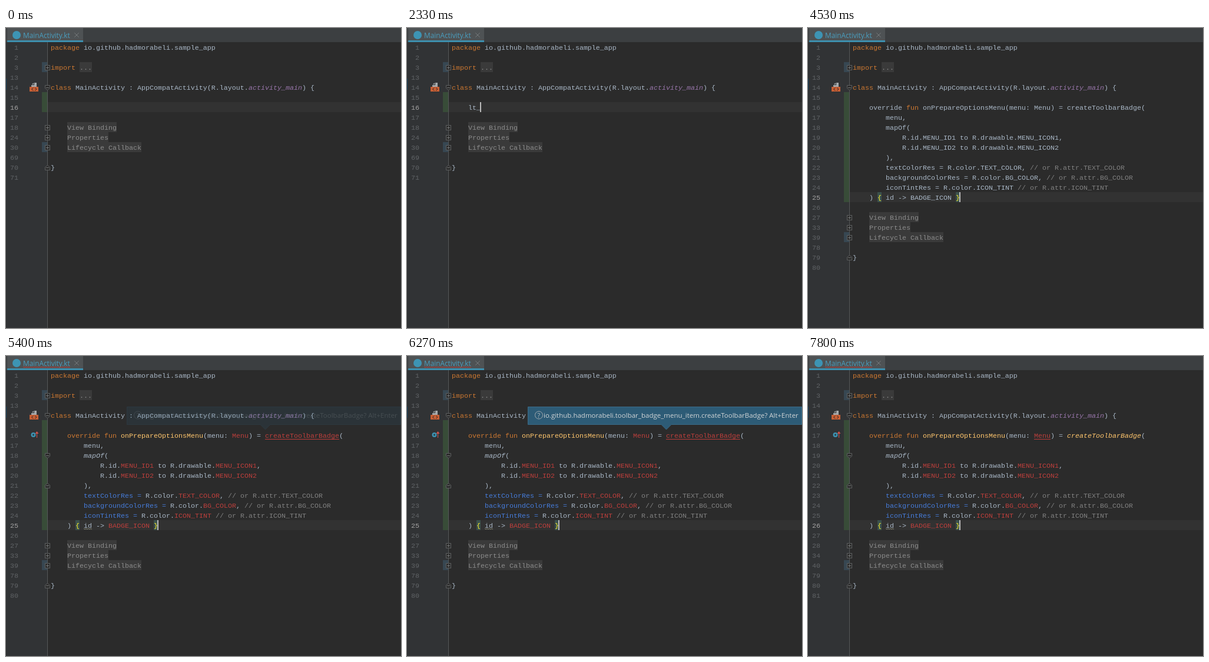
An HTML page with a canvas that plays this animation: 671 by 510 pixels, repeating every 8 s.

```html
<!DOCTYPE html>
<html>
<head>
<meta charset="utf-8">
<style>
  html, body { margin: 0; width: 100%; height: 100%; overflow: hidden; background: #2b2b2b; }
  canvas { display: block; }
</style>
</head>
<body>
<canvas id="stage" width="671" height="510"></canvas>
<script>
const ctx = document.getElementById('stage').getContext('2d');
const LOOP = 8000, ROW = 17, TOP = 24, LEFT = 76, CHAR = 7;
const MONO = '11.667px "Liberation Mono", monospace';
const UI = '"Open Sans", sans-serif';
const PLAIN = '#a9b7c6', RED = '#bc3f3c', YELLOW = '#ffc66d', ORANGE = '#cc7832';
const FOLD_EDGE = '#5c5e5f', FOLD_SIGN = '#717374';

const EXPAND = 4400, BRACES = 4530, KEYWORDS = 4800, ANALYSED = 5200, HINT = 5400,
      IMPORTED = 6800, RESOLVED = 7530, STYLED = 7670, MENU_MARKED = 7800;

// "~x" switches to style x until the next switch
const HEADER = [
  '~kpackage ~dio.github.hadmorabeli.sample_app',
  '',
  '~kimport ~f...',
  '',
  '~kclass ~dMainActivity : AppCompatActivity(R.layout.~pactivity_main~d) {',
  ''
];
const TEMPLATE = [
  '    ~ooverride ~kfun ~yonPrepareOptionsMenu~d(menu: ~uMenu~d) = ~ccreateToolbarBadge~d(',
  '        menu,',
  '        ~mmapOf~d(',
  '            R.id.~eMENU_ID1~d to R.drawable.~eMENU_ICON1~d,',
  '            R.id.~eMENU_ID2~d to R.drawable.~eMENU_ICON2',
  '        ),',
  '        ~ntextColorRes =~d R.color.~eTEXT_COLOR~d, ~g// or R.attr.TEXT_COLOR',
  '        ~nbackgroundColorRes =~d R.color.~eBG_COLOR~d, ~g// or R.attr.BG_COLOR',
  '        ~niconTintRes =~d R.color.~eICON_TINT~d ~g// or R.attr.ICON_TINT',
  '    ) ~b{~d ~wid~d -> ~eBADGE_ICON~d ~b}'
];
const FOOTER = ['', '    ~fView Binding', '    ~fProperties', '    ~fLifecycle Callback', '', '}', ''];

const TYPED = 'lt_toolbar';
const KEY_TIMES = [1930, 2070, 2270, 2530, 2730, 2870, 3000, 3200, 3270, 3400];
const POINTER = [[200, 14, 233], [270, 85, 160], [330, 160, 92], [470, 60, 60],
                 [530, 6, 30], [600, 160, 100], [730, 152, 135]];

const rowTop = i => TOP + ROW * i;

function box(x, y, w, h, color) {
  ctx.fillStyle = color;
  ctx.fillRect(x, y, w, h);
}

function text(str, x, y, color, font = MONO) {
  ctx.font = font;
  ctx.fillStyle = color;
  ctx.fillText(str, x, y);
}

function path(points, stroke, fill, close = true) {
  ctx.beginPath();
  points.forEach(([x, y]) => ctx.lineTo(x, y));
  if (close) ctx.closePath();
  if (fill) { ctx.fillStyle = fill; ctx.fill(); }
  if (stroke) { ctx.strokeStyle = stroke; ctx.lineWidth = 1; ctx.stroke(); }
}

function disc(x, y, r, color) {
  ctx.beginPath();
  ctx.arc(x, y, r, 0, 7);
  ctx.fillStyle = color;
  ctx.fill();
}

function wave(x1, x2, y, color) {
  const points = [];
  for (let x = x1; x <= x2; x += 2) points.push([x, y + (x - x1) % 4 / 2]);
  path(points, color, null, false);
}

function styleAt(code, t) {
  const analysed = t >= ANALYSED;
  switch (code) {
    case 'k': return { color: ORANGE };
    case 'o': return { color: t >= KEYWORDS ? ORANGE : PLAIN };
    case 'y': return { color: analysed ? YELLOW : PLAIN };
    case 'e': return { color: analysed ? RED : PLAIN };
    case 'u': return { color: analysed ? RED : PLAIN, underline: t >= MENU_MARKED };
    case 'n': return { color: analysed ? '#467cda' : PLAIN };
    case 'm': return { color: PLAIN, italic: analysed };
    case 'w': return { color: PLAIN, wavy: analysed };
    case 'p': return { color: '#9876aa', italic: true };
    case 'g': return { color: '#808080' };
    case 'f': return { color: '#8c8c8c', back: '#3a3a3a' };
    case 'b': return t >= BRACES ? { color: '#ffef28', back: '#3b514d' } : { color: PLAIN };
    case 'c':
      if (t >= STYLED) return { color: YELLOW, italic: true };
      return { color: analysed && t < RESOLVED ? RED : PLAIN, underline: t >= HINT && t < IMPORTED };
  }
  return { color: PLAIN };
}

function codeLine(source, row, t) {
  let x = LEFT;
  const y = rowTop(row);
  ('~d' + source).split('~').slice(1).forEach(part => {
    const style = styleAt(part[0], t), word = part.slice(1), width = word.length * CHAR;
    if (style.back) box(x, y, width, ROW, style.back);
    text(word, x, y + 13, style.color, (style.italic ? 'italic ' : '') + MONO);
    if (style.underline) box(x, y + 15, width, 1, RED);
    if (style.wavy) wave(x, x + width, y + 14.5, '#8a8a78');
    x += width;
  });
}

function foldBox(row) {
  const y = rowTop(row) + 5;
  box(66, y, 9, 9, FOLD_EDGE);
  box(67, y + 1, 7, 7, '#2b2b2b');
  box(68, y + 4, 5, 1, FOLD_SIGN);
  box(70, y + 2, 1, 5, FOLD_SIGN);
}

function foldEdge(row, dir) {
  const y = rowTop(row) + 9.5;
  path([[66.5, y - 4 * dir], [74.5, y - 4 * dir], [74.5, y + dir], [70.5, y + 4 * dir], [66.5, y + dir]],
    FOLD_EDGE, '#2b2b2b');
  box(68, y - 0.5, 5, 1, FOLD_SIGN);
}

function tabBar(t) {
  box(0, 0, 671, TOP, '#3c3f41');
  box(2, 0, 129, TOP, '#4e5254');
  box(2, 21, 129, 3, '#3d8fae');
  disc(18, 12, 7, '#3d94b4');
  text('MainActivity.kt', 29, 17, '#4a9fc0', '11.8px ' + UI);
  if (t >= ANALYSED) wave(29, 109, 18.5, RED);
  path([[116.5, 8.5], [123.5, 15.5]], '#75797b');
  path([[123.5, 8.5], [116.5, 15.5]], '#75797b');
}

function layoutIcon() {
  path([[47, 93], [52, 93], [52, 100], [43, 100], [43, 97]], null, '#a4a8aa');
  box(43, 96, 5, 1, '#313335');
  box(47, 93, 1, 4, '#313335');
  box(40, 100, 15, 8, '#c75f35');
  path([[46.5, 101.5], [43.5, 104], [46.5, 106.5]], '#3a2a22', null, false);
  path([[49, 101.5], [52, 104], [49, 106.5]], '#3a2a22', null, false);
}

function overrideIcon() {
  disc(46.5, 134, 4, '#3d94b4');
  disc(46.5, 134, 1.7, '#31444c');
  box(52, 130, 1, 9, '#d0524c');
  path([[49.5, 132], [52.5, 128], [55.5, 132]], null, '#d0524c');
}

function gutter(lineNumbers, current, expanded, t) {
  box(0, TOP, 70, 486, '#313335');
  box(0, TOP, 1, 486, '#292b2d');
  box(0, 86, 1, 19, '#123a57');
  box(71, rowTop(current), 600, ROW, '#323232');
  box(61, rowTop(5), 10, ROW * (current - 4), '#384c38');
  const folds = expanded ? 17 : 8;
  [2, folds + 2].forEach(row => box(61, rowTop(row), 10, ROW, '#374752'));
  box(70, TOP, 1, 486, '#555759');
  lineNumbers.forEach((n, i) => text(String(n), 21 - String(n).length * CHAR, rowTop(i) + 13,
    i === current ? '#a4a3a3' : '#606366'));
  [2, folds, folds + 1, folds + 2].forEach(foldBox);
  foldEdge(4, 1);
  foldEdge(folds + 4, -1);
  layoutIcon();
  if (t >= ANALYSED) {
    overrideIcon();
    foldEdge(8, 1);
    foldEdge(11, -1);
  }
}

function completion() {
  box(93, 142, 297, 21, '#515355');
  box(94, 143, 295, 19, '#4b4d4f');
  text(TYPED, 104, 157, '#ad73c9');
  text('_badge', 104 + TYPED.length * CHAR, 157, '#b4b6b8');
  text('ToolbarBadgeMenuItem', 242, 157, '#737577');
}

function importHint(t) {
  if (t < HINT || t >= IMPORTED) return;
  ctx.globalAlpha = Math.min(1, Math.floor((t - HINT) / 67 + 1) / 6);
  path([[205.5, 86.5], [670.5, 86.5], [670.5, 116.5], [449, 116.5], [440.5, 125], [432, 116.5], [205.5, 116.5]],
    '#3a6a86', '#2d5b76');
  ctx.beginPath();
  ctx.arc(224, 100.5, 6.5, 0, 7);
  ctx.strokeStyle = '#a0a8ad';
  ctx.stroke();
  text('?', 221.5, 104.5, '#b0b8bd', '11px ' + UI);
  text('io.github.hadmorabeli.toolbar_badge_menu_item.createToolbarBadge? Alt+Enter',
    232, 105, '#d0d4d6', '11.5px ' + UI);
  ctx.globalAlpha = 1;
}

function pointer(t) {
  const step = POINTER.filter(p => t >= p[0]).pop();
  if (!step || t >= KEY_TIMES[0]) return;
  const [, x, y] = step, color = '#c4c4c4';
  box(x, y - 7, 1, 15, color);
  [-8, 8].forEach(dy => {
    box(x - 3, y + dy, 3, 1, color);
    box(x + 1, y + dy, 3, 1, color);
  });
}

function numbersAt(t) {
  const range = (from, to) => Array.from({ length: to - from + 1 }, (_, i) => from + i);
  if (t < EXPAND) return [1, 2, 3, ...range(13, 18), 24, 30, 69, 70, 71];
  const shift = t >= IMPORTED ? 1 : 0;
  return [1, 2, 3, ...[...range(13, 27), 33, 39, 78, 79, 80].map(n => n + shift)];
}

function draw(t) {
  const expanded = t >= EXPAND, current = expanded ? 15 : 6;
  const typed = TYPED.slice(0, KEY_TIMES.filter(k => t >= k).length);
  const body = expanded ? TEMPLATE : ['    ' + typed];

  box(0, 0, 671, 510, '#2b2b2b');
  tabBar(t);
  gutter(numbersAt(t), current, expanded, t);
  [...HEADER, ...body, ...FOOTER].forEach((line, i) => codeLine(line, i, t));

  const caretOn = t >= 730 && !(t >= 1730 && t < 1930) && !(t >= 4200 && t < EXPAND);
  const caretX = expanded ? 257 : 103 + typed.length * CHAR;
  if (caretOn) box(caretX, rowTop(current), 2, ROW, '#bbbbbb');

  if (t >= 3870 && !expanded) completion();
  importHint(t);
  pointer(t);
}

function frame() {
  draw(performance.now() % LOOP);
  requestAnimationFrame(frame);
}
frame();
</script>
</body>
</html>
```
